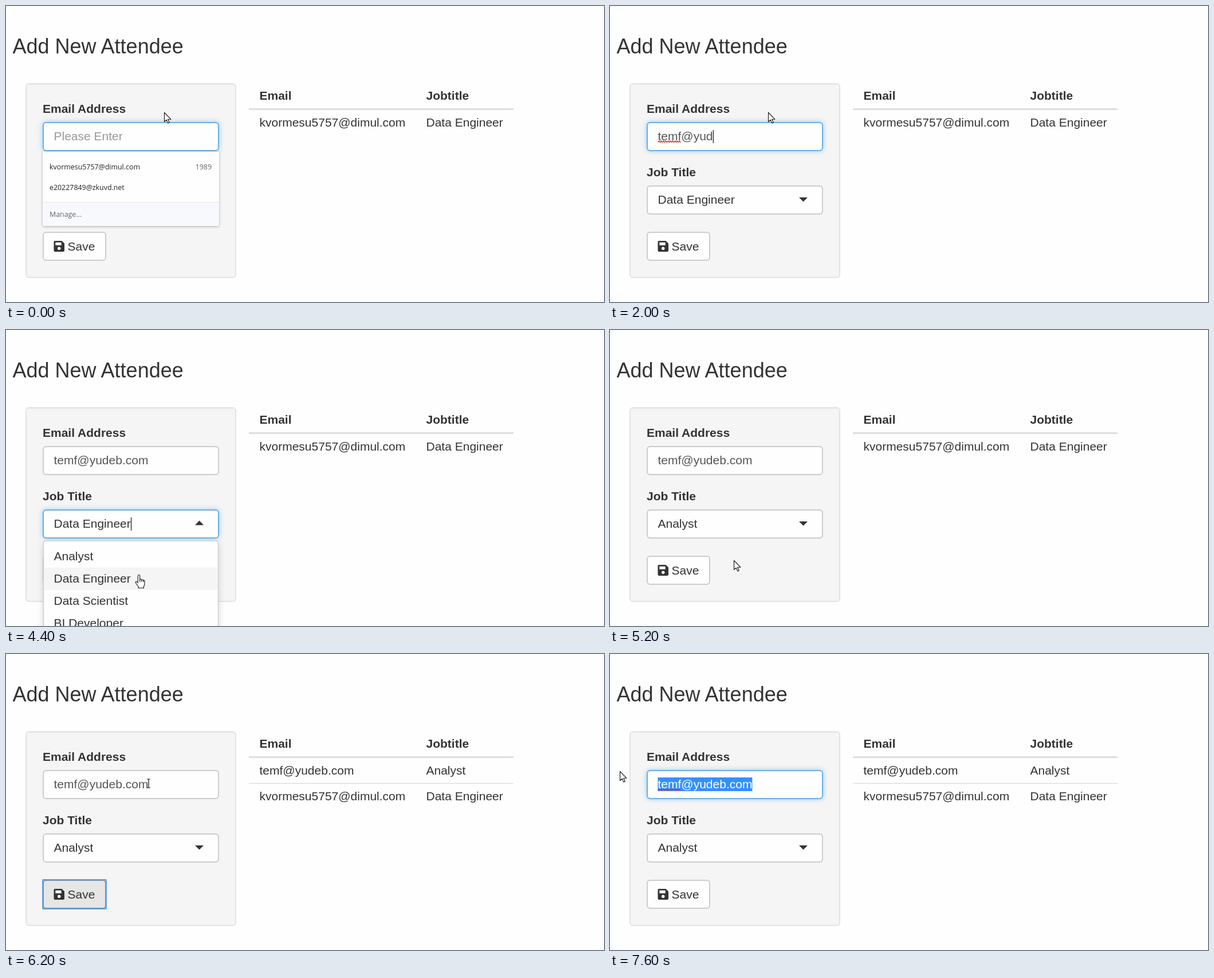
Recreate the animation shown at these times as an HTML page. Size 1044 by 518 pixels, loop 8 s.

```html
<!DOCTYPE html>
<html lang="en">
<head>
<meta charset="utf-8">
<title>Add New Attendee</title>
<style>
  html, body { margin: 0; width: 100%; height: 100%; overflow: hidden; background: #fefefe; }
  svg { display: block; width: 1044px; height: 518px; overflow: hidden; }
  text { font: 21px "Liberation Sans", Arial, sans-serif; fill: #333; white-space: pre; }
  .title { font-size: 36px; }
  .bold { font-weight: 700; }
  .field { fill: #fefefe; stroke: #ccc; stroke-width: 2; }
  .field.focus { stroke: #66afe9; filter: drop-shadow(0 0 5px rgba(102, 175, 233, .6)); }
  .button.hover { fill: #e6e6e6; stroke: #adadad; }
  .button.pressed { fill: #e6e6e6; stroke: #8c8c8c; }
  #email { fill: #555; }
  #email.empty { fill: #999; }
  #email.selected { fill: #fff; }
  .small text { font: 500 12.4px "Open Sans", "Noto Sans", sans-serif; fill: #222; }
  .small .dim { font-weight: 400; fill: #666; }
  .popup { filter: drop-shadow(0 1px 2px rgba(0, 0, 0, .3)); }
  .menu { filter: drop-shadow(0 6px 6px rgba(0, 0, 0, .16)); }
  .cursor path { fill: #fff; stroke: #111; stroke-width: 1.1; stroke-linejoin: round; }
  .cursor .line { fill: none; stroke-width: 1.2; }
</style>
</head>
<body>
<svg viewBox="0 0 1044 518">
  <text class="title" x="11.5" y="83">Add New Attendee</text>

  <rect x="35" y="136" width="366" height="339" rx="5" fill="#f5f5f5" stroke="#e3e3e3" stroke-width="2"/>
  <path d="M38 137.8H398" stroke="#ececec"/>

  <text class="bold" x="442.5" y="164">Email</text>
  <text class="bold" x="733.5" y="164">Jobtitle</text>
  <path d="M424 180.5H886" stroke="#ddd" stroke-width="3"/>
  <g id="newRow">
    <text x="442.5" y="211">temf@yudeb.com</text>
    <text x="733.5" y="211">Analyst</text>
    <path d="M424 226.5H886" stroke="#ddd" stroke-width="1.3"/>
  </g>
  <g id="oldRow">
    <text x="442.5" y="211">kvormesu5757@dimul.com</text>
    <text x="733.5" y="211">Data Engineer</text>
  </g>

  <text class="bold" x="64" y="187">Email Address</text>
  <rect id="emailBox" class="field" x="65" y="204" width="306" height="49" rx="5"/>
  <rect id="selection" y="216" height="24" fill="#3390ff"/>
  <text id="email" x="83.5" y="235"></text>
  <path id="squiggle" fill="none" stroke="#e0302a" stroke-width="1.3"/>

  <text class="bold" x="64" y="298">Job Title</text>
  <rect id="jobBox" class="field" x="65" y="315" width="306" height="49" rx="5"/>
  <text id="job" x="83.5" y="346"></text>
  <path id="arrowIcon" fill="#333"/>
  <path id="caret" stroke="#222" stroke-width="1.3"/>

  <rect id="saveBox" class="field button" x="65" y="396" width="109" height="49" rx="5"/>
  <rect id="saveRing" x="64" y="395" width="111" height="51" rx="1" fill="none" stroke="#5b9ce0" stroke-width="1.8"/>
  <path d="M85.5 411H97.5L102 415.5V427.5Q102 430 99.5 430H86Q83.500 430 83.500 427.500V413Q83.500 411 85.500 411Z" fill="#333"/>
  <path d="M86.300 413.700H96.700V418.700H86.300Z" fill="#fefefe"/>
  <circle cx="92.700" cy="424.300" r="2.700" fill="#fefefe"/>
  <text x="107.500" y="428">Save</text>

  <g id="suggestions" class="small">
    <g class="popup">
      <path d="M64 255H372V382Q372 385 369 385H67Q64 385 64 382Z" fill="#fefefe"/>
    </g>
    <path d="M64 344H372V382Q372 385 369 385H67Q64 385 64 382Z" fill="#f8f9fc"/>
    <path d="M64 343.500H372" stroke="#e6e8ec"/>
    <text x="76" y="286">kvormesu5757@dimul.com</text>
    <text class="dim" x="359" y="286" text-anchor="end">1989</text>
    <text x="76" y="322">e20227849@zkuvd.net</text>
    <text class="dim" x="76" y="369">Manage...</text>
  </g>

  <g id="menu">
    <rect class="menu" x="65.500" y="369" width="305" height="180" rx="4" fill="#fefefe" stroke="#d0d0d0" stroke-width="1.500"/>
    <rect id="hoverRow" x="66.500" width="303" height="39" fill="#f5f5f5"/>
    <text x="83.500" y="403">Analyst</text>
    <text x="83.500" y="442">Data Engineer</text>
    <text x="83.500" y="481">Data Scientist</text>
    <text x="83.500" y="520">BI Developer</text>
  </g>

  <g id="arrow" class="cursor"><path d="M0 0V16L3.700 12.600L6.300 18.600L8.700 17.500L6.200 11.700H11.300Z"/></g>
  <g id="hand" class="cursor">
    <path d="M-1.700 1.700Q-1.700 0 0 0T1.700 1.700V8Q3.200 6.800 4.700 8.500Q6.500 7.600 7.700 9.500Q10 9 10 11.500V15.500Q10 18 8.500 20V23H-1V20.500L-5.500 14Q-6.500 11.500-4 11.500L-1.700 14Z"/>
    <path class="line" d="M1.700 8V12M4.700 8.500V12M7.700 9.500V12.500"/>
  </g>
  <g id="ibeam" class="cursor"><path class="line" d="M-3-7.500H-1Q0-7.500 0-6.500Q0-7.500 1-7.500H3M0-6.500V6.500M-3 7.500H-1Q0 7.500 0 6.500Q0 7.500 1 7.500H3"/></g>
</svg>
<script>
const DURATION = 8000;
const ADDRESS = "temf@yudeb.com";
const TEXT_X = 83.5;
const $ = id => document.getElementById(id);

const start = {
  typed: 0, focus: "email", caret: false, suggestions: true, job: "Data Engineer",
  menu: false, hover: 1, save: "", added: false, selectFrom: ADDRESS.length,
  cursor: ["arrow", 276.5, 186.5]
};

// Each step changes part of the state from its time on.
const steps = [
  [200, { typed: 1, caret: true, suggestions: false }],
  [400, { typed: 2 }],
  [600, { typed: 3 }],
  [800, { typed: 4 }],
  [1200, { caret: false }],
  [1400, { typed: 5, caret: true }],
  [1600, { typed: 6 }],
  [1800, { typed: 7 }],
  [2000, { typed: 8 }],
  [2400, { typed: 9 }],
  [2600, { typed: 10 }],
  [2800, { typed: 11 }],
  [3000, { typed: 13 }],
  [3200, { typed: 14 }],
  [3800, { caret: false }],
  [4000, { cursor: ["arrow", 257.5, 285.5] }],
  [4200, { focus: "job", caret: true, menu: true, cursor: ["hand", 238, 345] }],
  [4400, { cursor: ["hand", 232, 428.5] }],
  [4600, { hover: 0, cursor: ["hand", 222, 407] }],
  [4800, { cursor: ["hand", 217, 403.5] }],
  [5000, { focus: "", caret: false, menu: false, job: "Analyst", cursor: ["arrow", 216.5, 403.5] }],
  [5400, { cursor: ["arrow", 184.5, 415.5] }],
  [5600, { save: "hover", cursor: ["hand", 148, 422] }],
  [5800, { save: "pressed" }],
  [6000, { added: true }],
  [6200, { cursor: ["ibeam", 249, 226.5] }],
  [6400, { focus: "email", caret: true, save: "" }],
  [6600, { caret: false, selectFrom: 7, cursor: ["ibeam", 160, 224] }],
  [6800, { selectFrom: 0, cursor: ["ibeam", 76, 218] }],
  [7000, { cursor: ["arrow", 38.5, 210.5] }],
  [7200, { cursor: ["arrow", 17.5, 207.5] }],
  [7400, { cursor: ["arrow", 3.5, 206.5] }],
  [7600, { cursor: ["arrow", 17.5, 205.5] }]
];

const show = (id, on) => { $(id).style.display = on ? "" : "none"; };
const set = (id, name, value) => $(id).setAttribute(name, value);

function setText(id, value) {
  if ($(id).textContent !== value) $(id).textContent = value;
}

function stateAt(time) {
  return Object.assign({}, start, ...steps.filter(([at]) => at <= time).map(([, change]) => change));
}

function draw(state) {
  const { typed, focus, selectFrom } = state;
  const selecting = selectFrom < ADDRESS.length;

  setText("email", typed ? ADDRESS.slice(0, typed) : "Please Enter");
  set("email", "class", typed ? "" : "empty");
  setText("job", state.job);
  for (const name of ["email", "job"]) $(name + "Box").classList.toggle("focus", focus === name);

  show("selection", selecting);
  if (selecting) {
    const from = selectFrom ? $("email").getSubStringLength(0, selectFrom) : 0;
    set("selection", "x", TEXT_X + from);
    set("selection", "width", $("email").getComputedTextLength() - from);
    if (!selectFrom) set("email", "class", "selected");
  }
  show("squiggle", focus === "email" && typed > 4);

  show("caret", state.caret);
  if (state.caret) {
    const x = TEXT_X + $(focus).getComputedTextLength() + .8;
    set("caret", "d", `M${x} ${focus === "email" ? 217 : 328}v23`);
  }

  set("arrowIcon", "d", state.menu ? "M330 341.5h15l-7.500-8z" : "M330 335h15l-7.500 7.500z");
  show("suggestions", state.suggestions);
  show("menu", state.menu);
  set("hoverRow", "y", 377 + 39 * state.hover);
  set("saveBox", "class", "field button " + state.save);
  show("saveRing", state.save === "pressed");
  show("newRow", state.added);
  set("oldRow", "transform", `translate(0 ${state.added ? 45 : 0})`);

  const [shape, x, y] = state.cursor;
  for (const name of ["arrow", "hand", "ibeam"]) show(name, name === shape);
  set(shape, "transform", `translate(${x} ${y})`);
}

set("squiggle", "d", "M83.5 238.5" + "l2-2.200 2 2.200".repeat(10));

const began = performance.now();
function tick() {
  draw(stateAt((performance.now() - began) % DURATION));
  requestAnimationFrame(tick);
}
tick();
</script>
</body>
</html>
```
